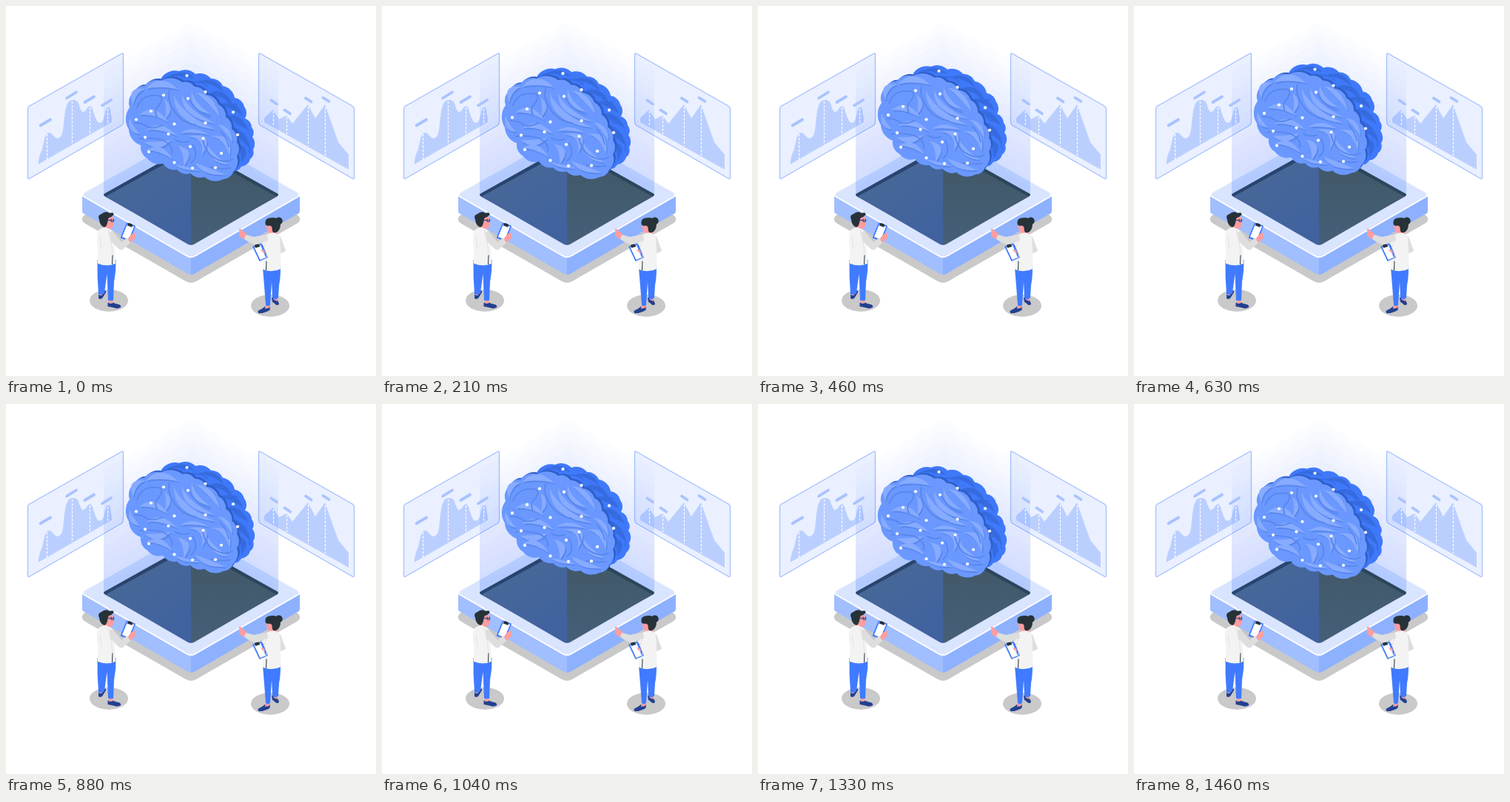
Write an HTML page that moves like this. It is 500x500 px and loops after 1500 ms.

```html
<!DOCTYPE html>
<html lang="en">
<head>
<meta charset="utf-8">
<title>Brain hologram</title>
<style>
html, body { margin: 0; width: 100%; height: 100%; overflow: hidden; background: #fff }
svg { display: block; width: 100vw; height: 100vh }
.panel { fill: #407bff; fill-opacity: .11; stroke: #407bff; stroke-opacity: .45; stroke-linejoin: round; stroke-width: 1.3 }
.chart { fill: #407bff; fill-opacity: .28 }
.label { fill: none; stroke: #a9c3ff; stroke-width: 3.8; stroke-linecap: round }
.dash { fill: none; stroke: #fff; stroke-width: 1.2; stroke-dasharray: 3.2 2 }
.shade { fill: #c9c9c9 }
.blue { fill: #407bff }
.navy { fill: #23408f }
.hair { fill: #263238 }
.skin { fill: #ff9da0 }
.coat { fill: #f3f3f3 }
.sleeve { fill: #dedede }
.line { fill: none; stroke-linecap: round; stroke-linejoin: round }
</style>
</head>
<body>
<svg viewBox="0 0 500 500">
  <defs>
    <linearGradient id="left" x1="0" y1="0" x2=".6" y2="1">
      <stop stop-color="#4b6a94"/><stop offset="1" stop-color="#40629f"/>
    </linearGradient>
    <linearGradient id="right" x1="0" y1="0" x2="0" y2="1">
      <stop stop-color="#405765"/><stop offset="1" stop-color="#465f78"/>
    </linearGradient>
  </defs>

  <!-- platform -->
  <path class="shade" d="M108 281Q98 288 107 294L243 372Q250 376 257 372L393 294Q402 288 392 281L250 200Z"/>
  <path fill="#a1beff" d="M103 255V277Q103 280 106 281L244 361Q247 363 250 363V338Z"/>
  <path fill="#8eb1ff" d="M397 255V277Q397 280 394 281L256 361Q253 363 250 363V338Z"/>
  <path fill="#d9e4ff" stroke="#fff" stroke-width="1.8" d="M105 252Q102 255 105 257.500L244 337.500Q250 341 256 337.500L395 257.500Q398 255 395 252L256 173Q250 169 244 173Z"/>

  <g id="beam" fill="#407bff" fill-opacity=".019"></g>

  <!-- screen -->
  <path fill="#29456f" d="M134 253L250 188V322L134 257.500Q130 255 134 253Z"/>
  <path fill="#2b465c" d="M366 253L250 188V322L366 257.500Q370 255 366 253Z"/>
  <path fill="url(#left)" d="M134.500 257.500L250 194V323Q248 323 245 321.500Z"/>
  <path fill="url(#right)" d="M365.500 257.500L250 194V323Q252 323 255 321.500Z"/>

  <!-- left chart -->
  <path class="panel" d="M32 135L156 64.500Q158.500 63 158.500 66V157Q158.500 160 156 161.500L32 233Q29.500 234.500 29.500 232V139Q29.500 136.500 32 135Z"/>
  <path class="chart" d="M43.500 214C45 200 47 199 49 193S52 171 58 171 66 182 72 178 77 164 79 149 83 127 91 127 98 134 101 140 107 142 109 139 115 131 118 142 124 160 129 157 133 137 138 137 141 149 143 150V157Z"/>
  <path class="label" d="M46.500 161.500L60 153.500M82 124.500L95 116.500M106.500 130L119 122.500M130 134.500L142 127"/>
  <path class="dash" d="M55.500 173V207M89.500 129V187M113.500 137V174M137.500 139V160"/>

  <!-- right chart -->
  <path class="panel" d="M468 135L344 64.500Q341.500 63 341.500 66V157Q341.500 160 344 161.500L468 233Q470.500 234.500 470.500 232V139Q470.500 136.500 468 135Z"/>
  <path class="chart" d="M349 157V151L361 140 369 153 379 148 387 159 408 133 418 152 431 133 449 184 463 201V221Z"/>
  <path class="label" d="M358.500 127.500L366 132.500M376.500 140.500L384 145.500M405 124.500L412.500 129.500M428.500 124L436.500 129"/>
  <path class="dash" d="M361.500 142V163M379.500 150V173M408.500 136V189M431.500 137V202"/>

  <g id="brain"></g>

  <!-- man -->
  <ellipse class="shade" cx="139" cy="398" rx="26" ry="15"/>
  <path class="navy" d="M125 390L132 385Q136 384 135 387Q132 392 130 395Q127 397 125 395ZM137.500 401L143 400Q148 403 153 403.500Q156 405 155 407Q151 410 145 407.500L137.500 406Z"/>
  <path class="skin" d="M126 386H131L130 391H126ZM139 396H144V402H139Z"/>
  <path class="blue" d="M123.500 343H148.500Q149 358 146 373L145 398H138L136.500 362L133 388Q129 392 125 389Q123 365 123.500 343Z"/>
  <path class="skin" d="M131 292H140V304H131Z"/>
  <path class="skin" d="M135 285H145L146 293Q145 301 140 301L134 297Z"/>
  <path class="hair" d="M126 289Q123 283 129 281Q135 276 140 280Q146 278 145.500 282Q142 286 138.500 286.500L137 293Q136 298 133 299Q127 297 126 289Z"/>
  <path class="line" stroke="#263f86" stroke-width="1" d="M138 289.500H144.500M142 288V291.500H145.500V288"/>
  <path class="skin" d="M164 316Q168 309 173 306L175 308Q173 312 175 313Q170 319 165 319Z"/>
  <path class="blue" d="M163 292.500L174.500 296.500Q175 297 174.700 298L167.500 317Q167 318 166 317.500L154.500 313.500Z"/>
  <path fill="#fff" d="M164 294.500L173 298 166 315.500 157 312Z"/>
  <path class="hair" d="M166 293L171 295 170.500 299 163.500 296.500Z"/>
  <path class="skin" d="M165 314Q170 306 174 307L172 312 175 310Q175 317 167 319Z"/>
  <path class="coat" d="M125 303Q130 299 135 299L143 303Q147 307 146.500 320L148 348Q137 353 124 348V328Q121 312 125 303Z"/>
  <path class="sleeve" d="M140 305Q144 304 147 308L156 319 164 313 168 320 158 329Q155 331 152 328L141 317Z"/>
  <path class="line" stroke="#263238" stroke-width="1" d="M144 337L143.500 349"/>
  <path class="line" stroke="#ddd" stroke-width=".8" d="M138 303Q143 319 144 336M127 312L129 328"/>

  <!-- woman -->
  <ellipse class="shade" cx="357" cy="405" rx="26" ry="15"/>
  <path class="navy" d="M340.500 412Q347 409 350 406L357 406.500 356.500 411Q348 416 341 415ZM359 394L364 394Q369 400 369 403Q366 406 363 402L360 400Z"/>
  <path class="skin" d="M351 401H356V408L350 409ZM360 392H365L367 399 362 397Z"/>
  <path class="sleeve" d="M367 309Q372 311 374 320L378 330Q377 333 370 334L365 325Z"/>
  <path class="blue" d="M347 354H371Q371 368 369 377L368 394Q364 399 360 394L359 373 357 404Q354 407 351 404Q349 378 347 354Z"/>
  <path class="skin" d="M357 298H366V310H357Z"/>
  <path class="skin" d="M352 291H363V303Q359 307 354 306Q351 302 352 291Z"/>
  <circle class="hair" cx="368.700" cy="290.500" r="5"/>
  <path class="hair" d="M351 296Q349 289 354 287Q364 284 370 290Q373 299 367 305Q361 308 360 304L359 298Q356 296 354 297Z"/>
  <circle class="skin" cx="357.500" cy="300" r="2"/>
  <path class="coat" d="M351 310Q357 305 364 307Q370 309 370.500 316L371 335 372 355Q360 361 347 356L348 332Q345 319 351 310Z"/>
  <path class="blue" d="M333 325L344 321Q346 321 347 323L354 340 342.500 345Z"/>
  <path fill="#fff" d="M335.500 326L344 323 351 340 343.500 343Z"/>
  <path class="hair" d="M336 323L341 321.500 343.500 325 337 327Z"/>
  <path class="skin" d="M344 329L349 330 350 335 346 332Z"/>
  <path class="coat" d="M350 325H363Q371 327 371 333L368 338 351 333Z"/>
  <path class="skin" d="M315 301L317 301 319 304Q325 305 326 312L321 315 315.500 311Z"/>
  <path class="sleeve" d="M324 309L335 312 351 309Q356 312 353 317L339 322Q333 323 322 315Z"/>
  <path class="line" stroke="#263238" stroke-width="1" d="M352 345L351.500 357"/>
  <path class="line" stroke="#ddd" stroke-width=".8" d="M353 314L349 327M352 335V344"/>
</svg>
<script>
const $ = id => document.getElementById(id);
const brain = $('brain');

function add(parent, tag, attrs) {
  const node = document.createElementNS('http://www.w3.org/2000/svg', tag);
  for (const key in attrs) node.setAttribute(key, attrs[key]);
  parent.append(node);
}

const groups = (text, size) => {
  const n = text.trim().split(/\s+/).map(Number);
  return Array.from({ length: n.length / size }, (_, i) => n.slice(i * size, (i + 1) * size));
};

// Closed outline of shallow outward bumps
function scallop(text) {
  const pts = groups(text, 2);
  return 'M' + pts[0] + pts.map(([x, y], i) => {
    const [u, v] = pts[(i + 1) % pts.length];
    const r = Math.hypot(u - x, v - y) * .88;
    return `A${r} ${r} 0 0 1 ${u} ${v}`;
  }).join('') + 'Z';
}

// Tapered curves, each given as start, control, end and width
const leaves = text => groups(text, 7).map(([x, y, cx, cy, u, v, w]) => {
  const d = Math.hypot(u - x, v - y), nx = (y - v) / d * w, ny = (u - x) / d * w;
  return `M${x} ${y}Q${cx + nx} ${cy + ny} ${u} ${v}Q${cx - nx} ${cy - ny} ${x} ${y}Z`;
}).join('');

const path = (d, fill, more) => add(brain, 'path', { d, fill, ...more });
const fold = (d, stroke, width) =>
  path(d, 'none', { stroke, 'stroke-width': width, class: 'line' });

for (let y = 88; y < 250; y += 13)
  add($('beam'), 'path', { d: `M132 256V${y}L250 ${y - 66} 368 ${y}V256L250 322Z` });

const back = scallop(`210 97 234 88 256 92 277 98 293 108 309 124 322 136 323 152
  332 164 333 177 334 194 330 207 318 217 305 223 250 200`);
const front = scallop(`172 117 187 108 209 101 238 103 255 109 271 120 287 133 297 150
  305 166 312 184 312 203 307 224 294 234 268 231 249 226 231 221 212 213 191 206
  182 188 166 167 167 137`);

path(back, '#3f79fa');
path(leaves(`222 95 240 88 255 98 5  258 103 282 98 294 117 6  272 119 292 114 306 132 7
  288 133 310 132 320 148 7  298 148 314 150 328 168 7  304 162 320 174 330 192 8
  312 186 326 194 318 212 8`), '#366bdf');
fold('M218 96Q230 89 241 97M249 103Q264 100 272 109M294 122Q300 134 313 133M309 151Q307 160 322 163M315 181Q330 180 329 198', '#366bdf', 1.5);
path(front, '#2f5fc9', { transform: 'translate(2.500 -2)' });
path(front, '#6a98ff');

const ridges = leaves(`172 134 168 113 188 112 8  189 112 208 98 233 113 9
  214 126 224 138 215 153 6  227 120 232 154 284 167 9  238 119 240 146 284 159 7
  251 115 252 138 277 146 6  257 117 277 124 289 150 7  180 147 200 137 219 157 8
  167 151 168 168 181 173 6  190 168 206 158 232 176 7  187 184 206 192 223 181 8
  190 195 208 188 225 207 7  232 189 250 196 240 217 9  246 176 278 174 264 203 9
  236 172 252 165 274 174 5  278 176 303 176 302 204 8  272 188 278 208 300 214 7
  256 212 268 224 297 228 7  286 160 301 166 306 184 6  228 214 240 220 262 222 4`);
path(ridges, '#5887ec', { transform: 'translate(1.300 2)' });
path(ridges, '#87abff');
fold(`M177 137Q184 120 201 121Q216 120 207 134Q199 140 204 150M221 114Q217 127 227 141Q237 158 257 161
  M247 125Q257 145 276 150M174 158Q186 158 192 164Q200 166 212 161M181 179Q194 177 211 181Q226 188 224 199
  M229 181Q236 186 247 183M253 188Q261 204 250 212M266 181Q270 201 285 207Q297 213 306 207M276 218Q289 221 303 219
  M290 169Q299 179 301 190`, '#5887ec', 1.8);

for (const [cx, cy] of groups(`244.500 94 269.500 116 307 143.500 313 174 213 120.500 246 125
  196 142 176 153.500 227.500 159.500 269.500 158 219.500 173 188 177.500 193 197 266.500 179
  249 190 291 199 227.500 211.500 252 219 283 218.500`, 2))
  add(brain, 'circle', { cx, cy, r: 2.1, fill: '#fff' });

function draw() {
  const phase = performance.now() % 1500 / 1500;
  const lift = 10 * (1 - Math.abs(2 * phase - 1));
  brain.setAttribute('transform', `translate(0 ${-lift})`);
  requestAnimationFrame(draw);
}
draw();
</script>
</body>
</html>
```
